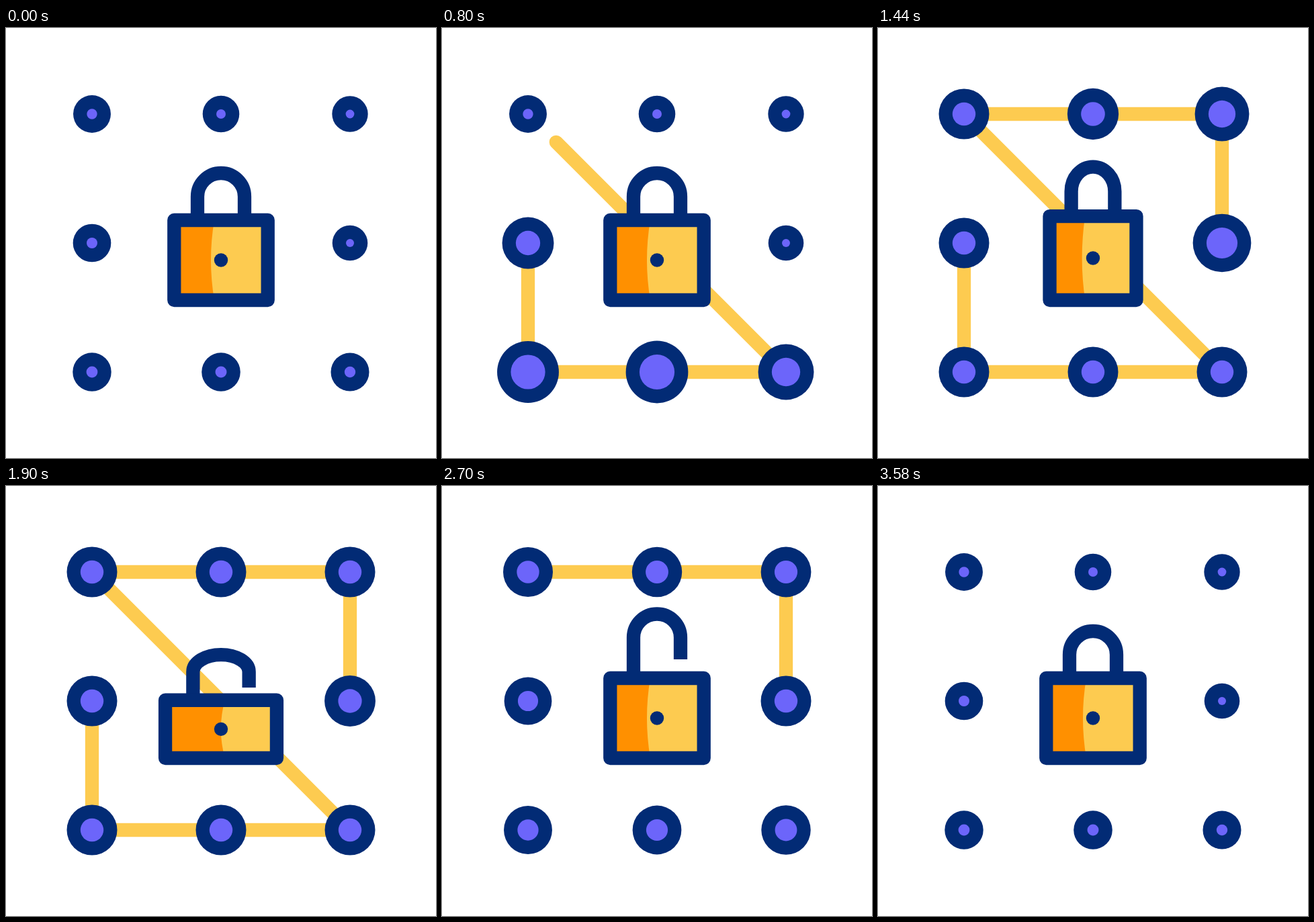
These frames come from a looping animation (640 by 640 pixels, 3600 ms). An HTML page with a canvas:

```html
<!DOCTYPE html>
<html lang="en">
<head>
<meta charset="utf-8">
<title>Pattern lock</title>
<style>
  html, body { margin: 0; width: 100%; height: 100%; overflow: hidden; background: #fff; }
  canvas { display: block; width: 640px; height: 640px; }
</style>
</head>
<body>
<canvas id="stage" width="640" height="640"></canvas>
<script>
const ctx = document.getElementById('stage').getContext('2d');
const LOOP = 3600;
const STROKE = 20.3;
const NAVY = '#022b75', PURPLE = '#6c65fa', YELLOW = '#fdcb50', ORANGE = '#ff9000';
const CELL = 192, MARGIN = 128;
const BASE = 405;
const DRAW_START = 260, ERASE_START = 2140, TRAVEL = 930;

// Cells of the 3 x 3 grid in the order the pattern visits them.
const dots = [3, 6, 7, 8, 0, 1, 2, 5].map(cell => ({
  x: MARGIN + CELL * (cell % 3),
  y: MARGIN + CELL * Math.floor(cell / 3)
}));

let pathLength = 0;
dots.forEach((dot, i) => {
  const from = dots[Math.max(0, i - 1)];
  pathLength += Math.hypot(dot.x - from.x, dot.y - from.y);
  dot.distance = pathLength;
});

const ease = u => (1 - Math.cos(Math.PI * u)) / 2;
const easeInverse = v => Math.acos(1 - 2 * v) / Math.PI;

// Each dot pulses as the line reaches it, the last one slower and larger,
// and the dots shrink again one after another.
dots.forEach((dot, i) => {
  const last = i === dots.length - 1;
  const idle = 27.5 + 1.3 * Math.cos(Math.PI * (i - 1.7) / 6);
  const peak = 47.5 - i / 2 + (last ? 7 : 0);
  const rest = 37.5;
  const arrival = DRAW_START + TRAVEL * easeInverse(dot.distance / pathLength);
  const top = arrival + (last ? 400 : 260);
  const shrink = 2415 + 38 * i;
  dot.radius = [[arrival, idle], [top, peak], [top + 350, rest], [shrink, rest], [shrink + 895, idle]];
});

const travelFrom = start => [[start, 0], [start + TRAVEL, pathLength]];
const lineHead = travelFrom(DRAW_START);
const lineTail = travelFrom(ERASE_START);
const stretch = [[1360, 1], [1520, 1.1], [1880, 0.72], [2150, 1.08], [2400, 1]];
const shackleLift = [[1640, 0], [1960, 25.5], [3020, 25.5], [3540, 0]];

function valueAt(keys, t) {
  if (t <= keys[0][0]) return keys[0][1];
  for (let i = 1; i < keys.length; i++) {
    const [t0, v0] = keys[i - 1], [t1, v1] = keys[i];
    if (t < t1) return v0 + (v1 - v0) * ease((t - t0) / (t1 - t0));
  }
  return keys[keys.length - 1][1];
}

function drawLine(t) {
  const tail = valueAt(lineTail, t);
  const length = valueAt(lineHead, t) - tail;
  if (length <= 0) return;
  ctx.save();
  ctx.strokeStyle = YELLOW;
  ctx.lineCap = ctx.lineJoin = 'round';
  ctx.setLineDash([length, 2 * pathLength]);
  ctx.lineDashOffset = -tail;
  ctx.beginPath();
  dots.forEach(d => ctx.lineTo(d.x, d.y));
  ctx.stroke();
  ctx.restore();
}

function disc(x, y, r, color) {
  ctx.fillStyle = color;
  ctx.beginPath();
  ctx.arc(x, y, r, 0, 2 * Math.PI);
  ctx.fill();
}

function drawDot(dot, t) {
  const r = valueAt(dot.radius, t);
  disc(dot.x, dot.y, r, NAVY);
  disc(dot.x, dot.y, r - STROKE, PURPLE);
}

function drawLock(t) {
  const sy = valueAt(stretch, t);
  const sx = 1 + (1 - sy) * (sy > 1 ? 1.5 : 0.69);
  const lift = valueAt(shackleLift, t);
  const X = x => 320 + (x - 320) * sx;
  const Y = y => BASE + (y - BASE) * sy;

  ctx.strokeStyle = NAVY;
  ctx.lineCap = 'butt';
  ctx.lineJoin = 'round';

  ctx.beginPath();
  ctx.moveTo(X(285), Y(288));
  ctx.ellipse(320, Y(251 - lift), 35 * sx, 35 * sy, 0, Math.PI, 2 * Math.PI);
  ctx.lineTo(X(355), Y(283.5 - lift));
  ctx.stroke();

  const left = X(250.3), top = Y(286), width = 139.4 * sx, height = BASE - top;
  ctx.fillStyle = YELLOW;
  ctx.fillRect(left, top, width, height);

  // The shaded side leans with the squash.
  const lean = 54 * (1 - sy);
  ctx.fillStyle = ORANGE;
  ctx.beginPath();
  ctx.moveTo(left, top);
  ctx.lineTo(X(310 + lean), top);
  ctx.quadraticCurveTo(X(300 + lean), (top + BASE) / 2, X(310 + lean), BASE);
  ctx.lineTo(left, BASE);
  ctx.fill();

  ctx.strokeRect(left, top, width, height);
  disc(320, Y(345.5), 10.2, NAVY);
}

function draw(now) {
  const t = now % LOOP;
  ctx.fillStyle = '#fff';
  ctx.fillRect(0, 0, 640, 640);
  ctx.lineWidth = STROKE;
  drawLine(t);
  dots.forEach(d => drawDot(d, t));
  drawLock(t);
}

let start;
function tick(now) {
  start ??= now;
  draw(now - start);
  requestAnimationFrame(tick);
}
draw(0);
requestAnimationFrame(tick);
</script>
</body>
</html>
```
